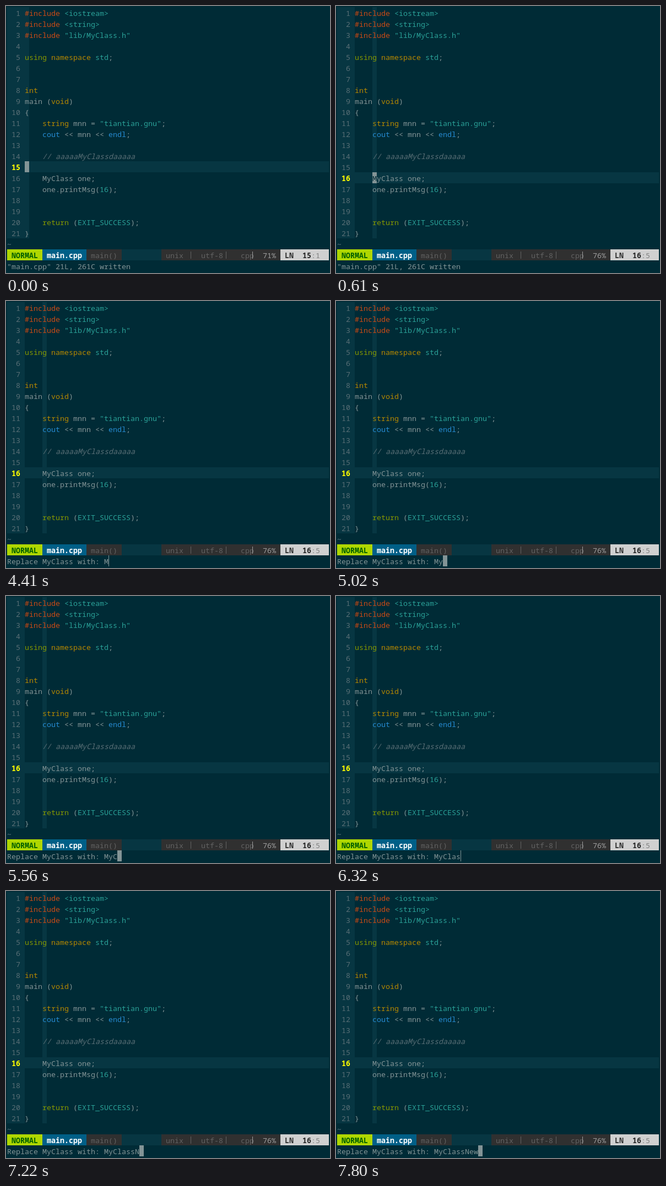
Recreate the animation shown at these times as an HTML page with a canvas. Size 588x485 px, loop 8 s.

```html
<!DOCTYPE html>
<html lang="en">
<head>
<meta charset="utf-8">
<title>Rename in editor</title>
<style>
html, body { margin: 0; width: 100%; height: 100%; overflow: hidden; background: #002b36; }
canvas { display: block; }
</style>
</head>
<body>
<canvas id="stage" width="588" height="485"></canvas>
<script>
const ctx = document.getElementById('stage').getContext('2d');
const LOOP = 8000, CW = 8, RH = 20, PAD = 2;
const BG = '#002b36', BAND = '#073642', TEXT = '#839496', DIM = '#586e75', CURSOR = '#839496';
const ORANGE = '#cb4b16', CYAN = '#2aa198', GREEN = '#859900', YELLOW = '#b58900', BLUE = '#268bd2';
const STATUS = 22, COMMAND = 23;

// Each line is a list of plain strings and [text, colour, style] runs.
const code = [
  [['#include', ORANGE], [' <iostream>', CYAN]],
  [['#include', ORANGE], [' <string>', CYAN]],
  [['#include', ORANGE], [' "lib/MyClass.h"', CYAN]],
  [],
  [['using', GREEN], [' namespace', YELLOW], [' std', CYAN], ';'],
  [],
  [],
  [['int', YELLOW]],
  ['main (', ['void', YELLOW], ')'],
  ['{'],
  [['    string', YELLOW], ' mnn = ', ['"tiantian.gnu"', CYAN], ';'],
  [['    cout', BLUE], ' << mnn << ', ['endl', BLUE], ';'],
  [],
  [['    // aaaaaMyClassdaaaaa', DIM, 'italic']],
  [],
  ['    MyClass one;'],
  ['    one.printMsg(', ['16', CYAN], ');'],
  [],
  [],
  [['    return', GREEN], ' (', ['EXIT_SUCCESS', CYAN], ');'],
  ['}']
];

const PROMPT = 'Replace MyClass with:';
const TYPED = ' MyClassNew';
// [time, typed characters, thin cursor]
const keys = [
  [2940, 0], [2980, 1], [4410, 2, true], [4450, 2], [5020, 3],
  [5520, 4, true], [5560, 4], [5940, 5], [6130, 6],
  [6320, 7, true], [6360, 7], [6470, 8, true], [6510, 8],
  [7220, 9], [7550, 10], [7800, 11]
];

const colX = col => PAD + col * CW;
const rowY = row => PAD + row * RH;

function fill(col, row, cols, rows, color) {
  ctx.fillStyle = color;
  ctx.fillRect(colX(col), rowY(row), cols * CW, rows * RH);
}

function write(col, row, text, color = TEXT, style = '') {
  ctx.font = `${style} 13.333px "Noto Sans Mono", "DejaVu Sans Mono", monospace`;
  ctx.fillStyle = color;
  [...text].forEach((ch, i) => {
    if (ch !== ' ') ctx.fillText(ch, colX(col + i), rowY(row) + 16);
  });
}

function cursor(col, row, thin) {
  ctx.fillStyle = CURSOR;
  ctx.fillRect(colX(col), rowY(row), thin ? 1 : CW, RH);
}

function drawCode(line, column) {
  fill(0, 0, 4, 21, BAND);
  fill(4 + column, 0, 1, 21, BAND);
  fill(4, line - 1, 69, 1, BAND);
  code.forEach((runs, row) => {
    const current = row + 1 === line;
    write(0, row, String(row + 1).padStart(3), current ? '#ffff00' : DIM, current ? 'bold' : '');
    let col = 4;
    for (const run of runs) {
      const [text, color, style] = [].concat(run);
      write(col, row, text, color, style);
      col += text.length;
    }
  });
  write(0, 21, '~', '#657b83');
}

function drawStatus(line, column, percent) {
  fill(0, STATUS, 73, 1, BAND);
  fill(0, STATUS, 8, 1, '#afd700');
  fill(8, STATUS, 10, 1, '#005f87');
  fill(18, STATUS, 8, 1, '#303030');
  fill(35, STATUS, 27, 1, '#303030');
  fill(62, STATUS, 11, 1, '#d0d0d0');
  write(1, STATUS, 'NORMAL', '#005f00', 'bold');
  write(9, STATUS, 'main.cpp', '#ffffff', 'bold');
  write(19, STATUS, 'main()', '#626262');
  write(36, STATUS, 'unix    utf-8    cpp', '#626262');
  write(58, STATUS, percent, '#9e9e9e');
  write(63, STATUS, 'LN', '#303030', 'bold');
  write(67, STATUS, String(line), '#262626', 'bold');
  write(69, STATUS, ':' + (column + 1), '#808080');
  for (const [col, color] of [[41, '#626262'], [49, '#626262'], [55, '#9e9e9e']]) {
    ctx.fillStyle = color;
    ctx.fillRect(colX(col) + 5, rowY(STATUS) + 4, 1, 13);
  }
}

function draw(t) {
  const moved = t >= 570;
  const line = moved ? 16 : 15, column = moved ? 4 : 0;
  ctx.fillStyle = BG;
  ctx.fillRect(0, 0, 588, 485);
  drawCode(line, column);
  drawStatus(line, column, moved ? '76%' : '71%');

  if (t < 2980) {
    const thin = moved && t < 610;
    cursor(4 + column, line - 1, thin);
    if (moved && !thin) write(8, 15, 'M', BG);
  }

  const key = keys.filter(k => k[0] <= t).pop();
  if (key) {
    const text = PROMPT + TYPED.slice(0, key[1]);
    write(0, COMMAND, text);
    cursor(text.length, COMMAND, key[2]);
  } else {
    write(0, COMMAND, '"main.cpp" 21L, 261C written');
  }
}

const start = performance.now();
function tick() {
  draw((performance.now() - start) % LOOP);
  requestAnimationFrame(tick);
}
tick();
</script>
</body>
</html>
```
